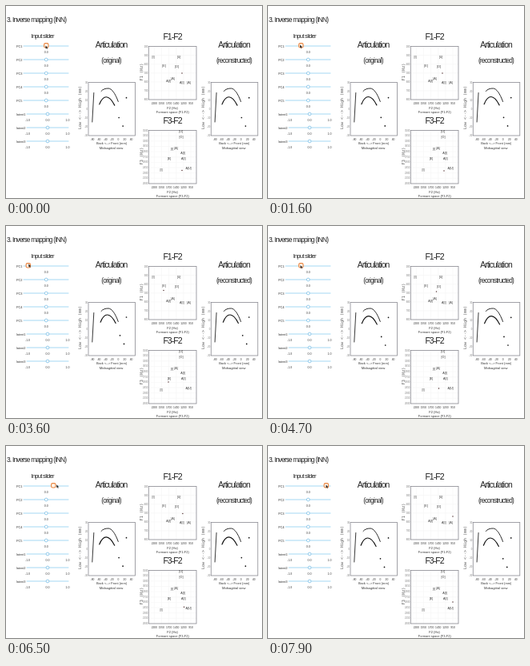
An HTML page that plays this animation: 320 px wide and 240 px high, repeating every 8 s.

```html
<!DOCTYPE html>
<html>
<head>
<meta charset="utf-8">
<style>
html, body { margin: 0; width: 100%; height: 100%; overflow: hidden; background: #fff }
svg { display: block; width: 100vw; height: 100vh }
text { font-family: "Liberation Sans", Arial, sans-serif; fill: #333 }
.head { letter-spacing: -.096em; fill: #222 }
.mono { font-family: "DejaVu Sans Mono", monospace; fill: #555 }
.tick { fill: #777 }
</style>
</head>
<body>
<svg id="stage" viewBox="0 0 320 240"></svg>
<script>
const stage = document.getElementById('stage');

function add(tag, attrs) {
  const el = document.createElementNS('http://www.w3.org/2000/svg', tag);
  for (const k in attrs) el.setAttribute(k, attrs[k]);
  stage.append(el);
  return el;
}
function text(s, x, y, size, anchor = 'middle', extra = {}) {
  const el = add('text', { x, y, 'font-size': size, 'text-anchor': anchor, ...extra });
  el.textContent = s;
  return el;
}
const heading = (s, x, y, size, anchor) => text(s, x, y, size, anchor, { class: 'head' });
const vertical = (s, x, y, size) =>
  text(s, x, y, size, 'middle', { class: 'mono', transform: `rotate(-90 ${x} ${y})` });
const line = (d, width = 1, color = '#222') =>
  add('path', { d, fill: 'none', stroke: color, 'stroke-width': width, 'stroke-linecap': 'round' });
const dot = (r, fill) => add('circle', { r, fill });
const range = (from, to, step) =>
  Array.from({ length: Math.round((to - from) / step) + 1 }, (_, i) => from + i * step);

function axes(x, y, w, h, xTicks, yTicks, inset, grid) {
  const px = i => x + inset + (w - 2 * inset) * i / (xTicks.length - 1);
  const py = i => y + h * i / (yTicks.length - 1);
  if (grid) {
    xTicks.forEach((_, i) => line(`M${px(i)} ${y}v${h}`, .5, '#f2f2f2'));
    yTicks.forEach((_, i) => line(`M${x} ${py(i)}h${w}`, .5, '#f2f2f2'));
  }
  add('rect', { x, y, width: w, height: h, fill: 'none', stroke: '#8a8a92', 'stroke-width': .8 });
  xTicks.forEach((s, i) => text(s, px(i), y + h + 6.2, 3.3));
  yTicks.forEach((s, i) => text(s, x - 1, py(i) + 1, 2.8, 'end', { class: 'tick' }));
}

// Headings
heading('3. Inverse mapping (INN)', 1, 19.7, 8.4, 'start');
heading('Input slider', 45.7, 40, 7.6);
for (const [x, sub] of [[131.5, '(original)'], [285, '(reconstructed)']]) {
  heading('Articulation', x, 52, 10.4);
  heading(sub, x, 71, 8.4);
}
heading('F1-F2', 208, 42, 10.6);
heading('F3-F2', 208, 147, 10.6);

// Sliders
['PC1', 'PC2', 'PC3', 'PC4', 'PC5', 'latent1', 'latent2', 'latent3'].forEach((name, i) => {
  const y = 50 + i * 17, latent = i > 4, left = latent ? 26 : 22, mid = latent ? 52 : 50.2;
  text(name, latent ? 24.5 : 20.5, y + 2, 3.9, 'end');
  line(`M${left} ${y}H78`, .9, '#9ad4f2');
  text('0.0', mid, y + 8.7, 3.5);
  if (latent) {
    text('-1.0', 27, y + 8.7, 3.5);
    text('1.0', 77, y + 8.7, 3.5);
  }
  if (i) add('circle', { cx: mid, cy: y, r: 1.9, fill: '#fff', stroke: '#7fc0e6', 'stroke-width': .8 });
});

// Vocal tract plots
const tracts = [0, 153.3].map(dx => {
  axes(103 + dx, 95.5, 58.5, 66.5, range(-80, 40, 20), range(-30, 30, 10).reverse(), 5, false);
  text('Back <--> Front (mm)', 132 + dx, 173.3, 4);
  text('Midsagittal view', 131.5 + dx, 179.2, 4.2);
  vertical('Low <--> High (mm)', 94.3 + dx, 127, 5);
  line(`M${109.8 + dx} 108.5L${107.8 + dx} 145`, .9);
  line(`M${119 + dx} 106.5C${121 + dx} 104 ${124 + dx} 103 ${128 + dx} 103` +
    `S${136.5 + dx} 109 ${140.3 + dx} 119.5`, .95);
  return { dx, tongue: line('', 1.15, '#111'), dots: [0, 1, 2].map(() => dot(.85, '#111')) };
});

// Formant plots
function formants(y, name, yTicks, labels) {
  axes(178.3, y, 59.7, 66.5, range(950, 2200, 250).reverse(), yTicks, 7, true);
  text('F2 (Hz)', 208, y + 78, 4.1);
  text(`Formant space (${name}-F2)`, 208.3, y + 83, 4);
  vertical(`${name} (Hz)`, 171, y + 32, 5.2);
  for (const [s, px, py] of labels) text(s, px, py + 1.3, 3.7);
  return dot(.75, '#533');
}
const stars = [
  formants(50.5, 'F1', range(200, 800, 100), [
    ['[I]', 184, 64], ['[U]', 216, 63.8], ['[E]', 197.5, 74.8], ['[O]', 213.5, 76],
    ['A[I]', 203, 93.7], ['[A]', 208.5, 91], ['A[I]', 219.7, 95.5], ['[A]', 228.5, 96]]),
  formants(155.5, 'F3', range(2000, 3500, 150).reverse(), [
    ['[U]', 218.7, 157], ['[O]', 219, 164], ['[I]', 207.5, 179], ['[A]', 212.5, 178],
    ['A[I]', 221, 184], ['[E]', 204, 191], ['A[I]', 221.8, 191], ['[I]', 194, 205],
    ['A[U]', 228, 203]])
];

const knob = add('rect', {
  y: 46.6, width: 5.4, height: 5.4, rx: 1.6, fill: '#fff6ec', stroke: '#ea8540', 'stroke-width': 1.1
});
const cursor = add('path', { d: 'M0 0v3.8l.9-.8.7 1.6.7-.4-.7-1.4h1.3z', fill: '#222' });

// Each row: time, slider steps, cursor x, y, F1-F2 point, F3-F2 point
const keys = [
  [0, 0, 49.5, 49.5, 220, 84, 220, 205.5],
  [1600, -2, 40, 48.5, 218, 84, 220, 206],
  [3600, -5, 28.3, 47.5, 197, 80.5, 203, 195],
  [4700, -2, 40.5, 49, 210.5, 82, 213.5, 203],
  [5800, 0, 56, 47, 216, 83, 218.5, 206],
  [7100, 4, 69.5, 49.5, 225, 86, 226, 197],
  [7900, 5, 72.5, 48.5, 231, 88, 231, 195]
];
function pose(t) {
  let i = 0;
  while (i < keys.length - 2 && t >= keys[i + 1][0]) i++;
  const a = keys[i], b = keys[i + 1], p = (t - a[0]) / (b[0] - a[0]);
  return a.map((v, k) => v + (b[k] - v) * p);
}
function place(el, x, y) {
  el.setAttribute('cx', x);
  el.setAttribute('cy', y);
}

function draw(now) {
  const t = Math.floor(now % 8000 / 100) * 100;
  const [, steps, cx, cy, x1, y1, x3, y3] = pose(t);
  knob.setAttribute('x', 47.6 + Math.round(steps) * 4.5);
  cursor.setAttribute('transform', `translate(${cx} ${cy})`);
  place(stars[0], x1, y1);
  place(stars[1], x3, y3);

  const u = (x1 - 219) / 22, lift = 2.6 * u, shift = -1.3 * u;
  for (const { dx, tongue, dots } of tracts) {
    const at = (x, y) => `${x + dx + shift} ${y + lift} `;
    tongue.setAttribute('d', 'M' + at(116.8, 122.8) + 'C' + at(119, 117) + at(121.5, 113.6) +
      at(125.5, 113.6) + 'S' + at(132.5, 117.5) + at(135.8, 124));
    place(dots[0], 150.5 + dx, 114.6 + u * .6);
    place(dots[1], 141.2 + dx + shift, 139.4 + lift);
    place(dots[2], 146.2 + dx + shift, 150 + lift);
  }
  requestAnimationFrame(draw);
}
draw(0);
</script>
</body>
</html>
```
